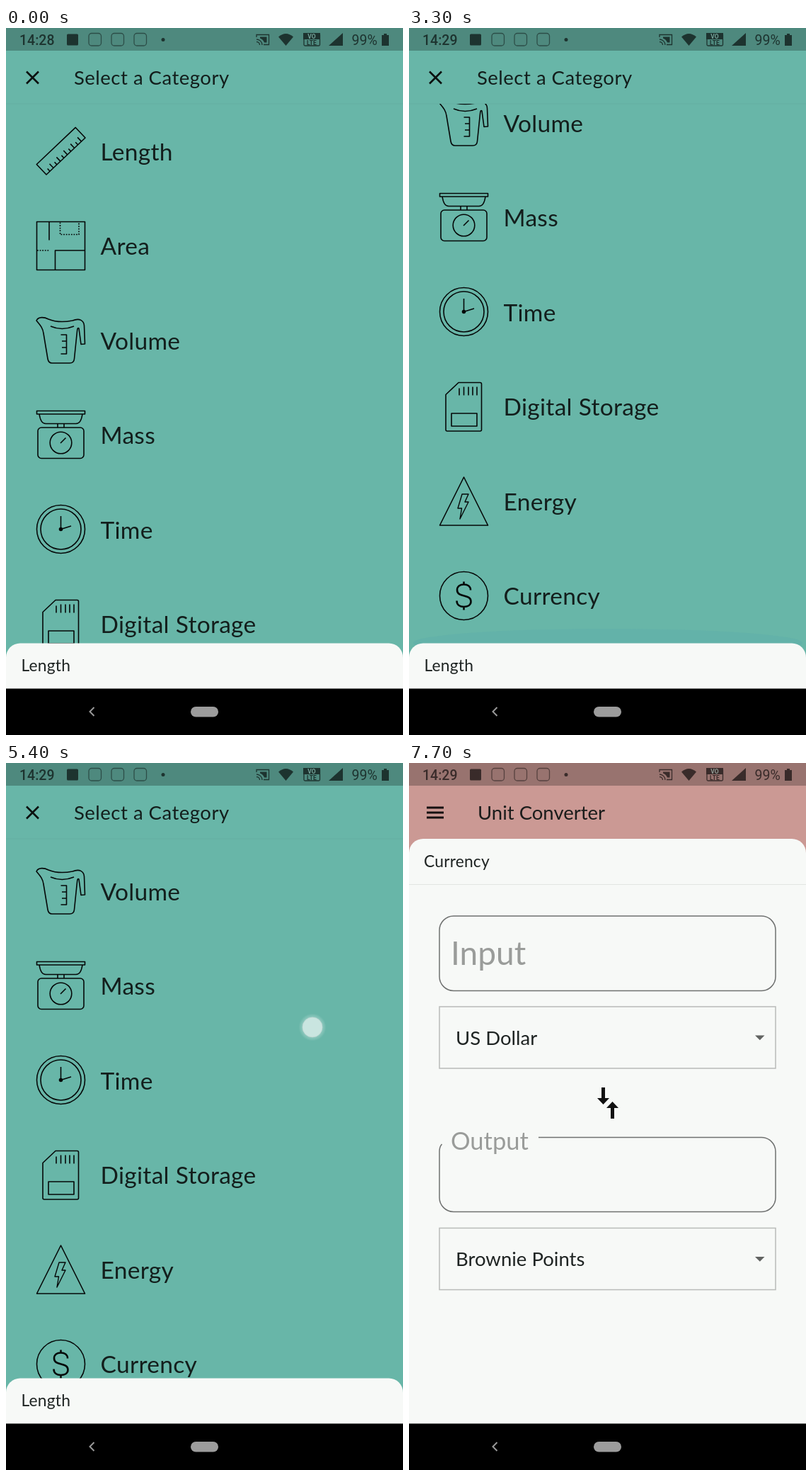
These frames come from a looping animation (561x998 px, 8 s). An HTML page:

```html
<!DOCTYPE html>
<html lang="en">
<head>
<meta charset="utf-8">
<title>Unit Converter</title>
<style>
  html, body { margin: 0; width: 100%; height: 100%; overflow: hidden; background: #000; }
  svg { display: block; width: 561px; height: 998px; font-family: Lato, sans-serif; }
  #app { --theme: #68b6a8; --ink: #0c1110; }
  #app.pink { --theme: #cb9994; }
  .theme { fill: var(--theme); }
  .ink { fill: var(--ink); fill-opacity: .92; }
  .line { fill: none; stroke: #050808; stroke-width: 1.6; stroke-linejoin: round; }
  .dots { stroke-dasharray: 1.8 1.8; }
  .status { font: 500 19.5px Roboto, sans-serif; fill: #000; opacity: .62; }
  .status .o { fill: none; stroke: #000; stroke-width: 1.3; }
  .status .app { opacity: .7; }
  .row { font-size: 33.5px; letter-spacing: .3px; }
  .title { font-size: 27.5px; letter-spacing: .5px; }
  #page .title { letter-spacing: 0; }
  .label { font-size: 22.8px; letter-spacing: .2px; }
  .paper { fill: #f7f9f7; }
  .field { fill: none; stroke: #6f7170; stroke-width: 1.5; }
  .select { fill: none; stroke: #b9bbb9; stroke-width: 1.5; }
  .hint { fill: #9a9c9a; }
</style>
</head>
<body>
<svg id="app" viewBox="0 0 561 998">
  <defs>
    <clipPath id="view"><rect y="107" width="561" height="826"/></clipPath>
    <clipPath id="pill"><rect x="11" y="735.5" width="539" height="132.5" rx="66"/></clipPath>
    <radialGradient id="halo">
      <stop offset=".7" stop-color="#fff" stop-opacity=".28"/>
      <stop offset="1" stop-color="#fff" stop-opacity="0"/>
    </radialGradient>
  </defs>

  <rect class="theme" width="561" height="998"/>

  <g id="menu">
    <ellipse id="glow" cx="281" cy="868" rx="275" ry="20" fill="#5aa9a8" opacity="0"/>
    <g clip-path="url(#pill)"><circle id="ripple" cx="381" cy="797" r="0" fill="#cb9994"/></g>
    <g clip-path="url(#view)"><g id="list"></g></g>
    <path d="M0 107H561" stroke="#000" stroke-opacity=".04"/>
    <path d="M29 61.500L46 78.500M46 61.500L29 78.500" stroke="#0c1110" stroke-width="2.600"/>
    <text class="ink title" x="96" y="80">Select a Category</text>
    <rect class="paper" y="868.500" width="561" height="100" rx="20"/>
    <text id="unit" class="ink label" x="21.500" y="908">Length</text>
    <g id="touch">
      <circle r="19.500" fill="url(#halo)"/>
      <circle r="14" fill="#fff" fill-opacity=".5" stroke="#c3d6d3" stroke-opacity=".6"/>
    </g>
  </g>

  <g id="page">
    <path d="M25 63H49M25 70H49M25 77H49" stroke="#151010" stroke-width="2.800"/>
    <text class="ink title" x="97" y="80">Unit Converter</text>
    <rect class="paper" y="107" width="561" height="850" rx="20"/>
    <text class="ink label" x="21" y="147">Currency</text>
    <path d="M0 171.500H561" stroke="#e2e5e2"/>
    <rect class="field" x="43" y="216" width="475" height="105.500" rx="20"/>
    <text class="hint" x="59" y="285" font-size="46">Input</text>
    <rect class="select" x="43" y="344" width="475" height="87"/>
    <text class="ink title" x="66" y="398">US Dollar</text>
    <path d="M489 384.500h13.500l-6.700 6.700z" fill="#616361"/>
    <path d="M272 458h5v15h6l-8.500 9-8.500-9h6zM285 502h5v-15h6l-8.500-9-8.500 9h6z" fill="#111"/>
    <path class="field" d="M183 528.500H498a20 20 0 0 1 20 20V613.500a20 20 0 0 1-20 20H63a20 20 0 0 1-20-20V548q0-6 3.500-10"/>
    <text class="hint" x="59" y="546" font-size="34.500">Output</text>
    <rect class="select" x="43" y="656.500" width="475" height="87"/>
    <text class="ink title" x="66" y="710">Brownie Points</text>
    <path d="M489 697h13.500l-6.700 6.700z" fill="#616361"/>
  </g>

  <rect width="561" height="32" fill="#000" opacity=".25"/>
  <g class="status">
    <text id="clock" x="19" y="23.500">14:28</text>
    <rect x="86" y="8.500" width="16" height="16" rx="1.500"/>
    <rect class="o app" x="117" y="7.500" width="17.500" height="17.500" rx="4"/>
    <rect class="o app" x="149" y="7.500" width="17.500" height="17.500" rx="4"/>
    <rect class="o app" x="181" y="7.500" width="17.500" height="17.500" rx="4"/>
    <circle cx="222" cy="16.500" r="2.500"/>
    <path class="o" d="M354 13V9.500H371.500V23.500H364M354 16a8 8 0 0 1 8 8M354 19.500a4.500 4.500 0 0 1 4.500 4.500"/>
    <path d="M359 12.500H368.500V20.500H365a11 11 0 0 0-6-6z"/>
    <path d="M385 12.500Q395.500 3.500 406 12.500L395.500 25z"/>
    <path d="M420 7H444V16H420z"/>
    <rect class="o" x="421" y="8" width="22.500" height="17" rx="1.500"/>
    <text x="432" y="15" font-size="8.500" font-weight="700" text-anchor="middle" fill="#8ab0a8">VO</text>
    <text x="432" y="24" font-size="8.500" font-weight="700" text-anchor="middle">LTE</text>
    <path d="M456 25L476 7V25z"/>
    <text x="488.500" y="23.500" font-weight="400">99%</text>
    <path d="M531 10h3V8h4v2h3V25H531z"/>
  </g>

  <rect y="932.500" width="561" height="66"/>
  <path d="M124.500 959L118.500 965L124.500 971" fill="none" stroke="#999" stroke-width="2"/>
  <rect x="261" y="958" width="39" height="14.500" rx="7.200" fill="#9c9c9c"/>
</svg>

<script>
const $ = id => document.getElementById(id);
const LOOP = 8000, STEP = 100, PITCH = 133.5, FIRST = 175;

// Icons are drawn around the middle line of their row.
const path = (d, extra = '') => `<path d="${d}" ${extra}/>`;
const circle = (x, y, r, extra = '') => `<circle cx="${x}" cy="${y}" r="${r}" ${extra}/>`;
const ticks = Array.from({ length: 10 }, (_, i) => `M${7 + i * 6.8} 0v${i % 2 ? -8 : -5}`).join('');

const rows = [
  ['Length', `<g transform="translate(57 32) rotate(-43.4)">${path('M0 0V-20H75.700V0Z' + ticks)}</g>`],
  ['Area', path('M43.500-35H111.500V33H43.500ZM61-35V-9M69.500 33V5.500H111.500') +
    path('M76.500-34V-17H103V-34M44 5.500H61', 'class="line dots"')],
  ['Volume', path('M43-29C46-35 54-34 60-31C72-26 84-27 94-29C104-33 110-29 110.500-22L111.500 4L106 4.500L103-18Q101-20 100.500-14L96.500 25Q96 31 90 31H65Q60 31 59 25L53-11C52-19 48-23 43-29Z') +
    path('M63-21Q79-14 96-21M77.500-9H85.500V18H77.500M79 0H85.500M79 9H85.500')],
  ['Mass', path('M43.500-35H111.500V-30.500H43.500ZM47-30.500Q49-17 56-17H99Q106-17 108-30.500M73-17V-11.500M82-17V-11.500') +
    '<rect x="45" y="-11.5" width="65" height="43.500" rx="5"/>' + circle(77.5, 10, 15.3) + path('M77 10.500L84.500 3')],
  ['Time', circle(77.5, -1.5, 34) + circle(77.5, -1.5, 28.5) +
    path('M77.500-20V-1.500L92-6') + circle(77.5, -1.5, 2, 'fill="#050808"')],
  ['Digital Storage', path('M70-35H100.500q2 0 2 2V31.500q0 2-2 2H54q-2 0-2-2V-18Z') +
    path('M71-27V-17M77.500-29V-17M84-29V-17M90-29V-17M96-29V-17M60 8.500H96V26.500H60Z')],
  ['Energy', path('M77.500-35L111.500 33H43.500Z') + path('M75-11H84L79 0H84L72 24L74.500 9H69Z', 'stroke-width="1.4"')],
  ['Currency', circle(77.5, -1, 34) +
    path('M87-9C87-14 83-17 77.500-17S68-14 68-9C68 2 87.500-4 87.500 7C87.500 12 83 14.500 77.500 14.500S67.500 12 67.500 6M77.500-21V-17M77.500 14.500V19',
      'style="stroke-width:2.6"')],
];

$('list').innerHTML = rows.map(([name, icon], i) =>
  `<g transform="translate(0 ${FIRST + i * PITCH})"><g class="line">${icon}</g>` +
  `<text class="ink row" x="133.5" y="11.5">${name}</text></g>`).join('');

// Each key is [time, ...values]; values run straight between keys.
function track(keys, t) {
  const next = keys.findIndex(k => k[0] > t);
  if (next === 0) return keys[0].slice(1);
  if (next < 0) return keys[keys.length - 1].slice(1);
  const a = keys[next - 1], b = keys[next];
  const p = (t - a[0]) / (b[0] - a[0]);
  return a.slice(1).map((v, i) => v + (b[i + 1] - v) * p);
}

const scroll = [[1200, 0], [1400, 20], [2000, 185], [2500, 290], [2800, 307], [3500, 307],
  [4300, 40], [4400, 35], [4600, 66.5], [5400, 260], [5600, 290], [5800, 307]];
// Finger x, and finger y measured on the scrolled list.
const finger = [[1200, 400, 689], [2000, 431, 689], [2500, 440, 689], [3400, 400, 637],
  [4600, 395, 637], [5400, 433, 633], [5600, 438, 633], [6500, 381, 1104]];
const presses = [[1200, 2500], [3400, 5600], [6500, 7200]];
const glow = [[2800, 0], [3000, .5], [3300, .35], [3600, 0]];
const ripple = [[6500, 0, 0], [6600, 110, .6], [6800, 390, 1]];

function draw(t) {
  const [s] = track(scroll, t), [x, y] = track(finger, t), [r, a] = track(ripple, t);
  const pressed = presses.some(([from, to]) => t >= from && t < to);
  const chosen = t >= 7500, open = t >= 7700;

  $('list').setAttribute('transform', `translate(0 ${-s})`);
  $('touch').setAttribute('transform', `translate(${x} ${y - s})`);
  $('touch').style.display = pressed ? '' : 'none';
  $('glow').setAttribute('opacity', track(glow, t)[0]);
  $('ripple').setAttribute('r', r);
  $('ripple').setAttribute('opacity', a);
  $('clock').textContent = t < 2500 ? '14:28' : '14:29';
  $('unit').textContent = chosen ? 'Currency' : 'Length';
  $('app').classList.toggle('pink', chosen);
  $('menu').style.display = open ? 'none' : '';
  $('page').style.display = open ? '' : 'none';
}

const start = performance.now();
function tick() {
  const t = (performance.now() - start) % LOOP;
  draw(Math.floor(t / STEP) * STEP);
  requestAnimationFrame(tick);
}
tick();
</script>
</body>
</html>
```
